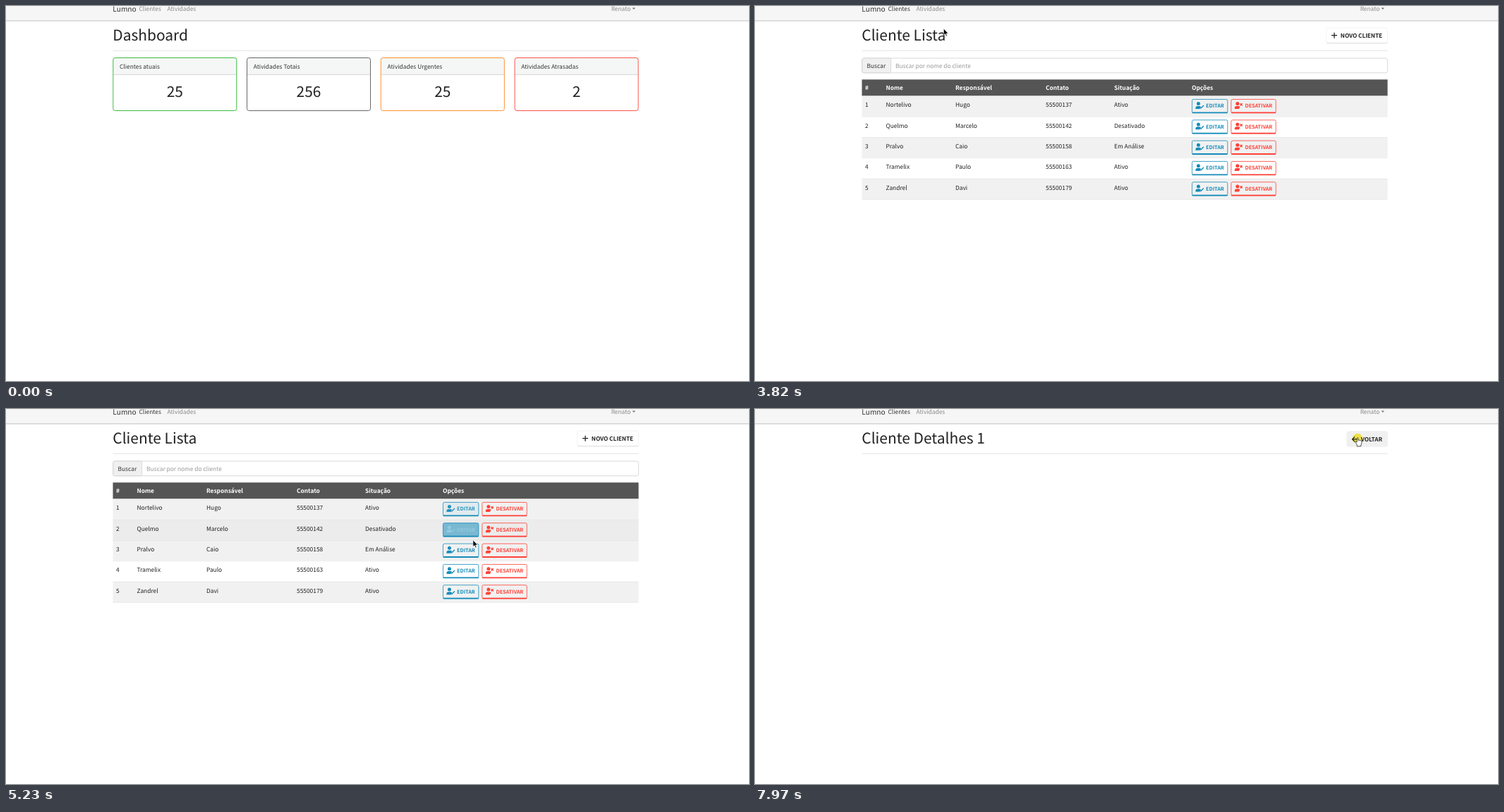
Animation, 1053 px wide and 532 px high, one loop 8000 ms. Source, as an HTML page:

```html
<!DOCTYPE html>
<html lang="pt">
<head>
<meta charset="utf-8">
<title>Dashboard</title>
<style>
html, body { margin: 0; width: 100%; height: 100%; overflow: hidden; background: #fff; }
svg { display: block; width: 100vw; height: 100vh; }
text {
  font-family: "Noto Sans CJK JP", "Noto Sans CJK SC", "Noto Sans CJK KR", "Noto Sans", sans-serif;
  text-rendering: geometricPrecision; white-space: pre;
}
.click { mix-blend-mode: multiply; }
</style>
</head>
<body>
<svg id="stage" viewBox="0 0 1053 532"></svg>
<script>
const LOOP = 8000, LIST_AT = 3620, DETAIL_AT = 6765;
const BODY = 8.4, TITLE = 20.95, INK = '#222';
const ROW_TOP = 127.5, ROW_H = 29.35;

const columns = [[156, '#'], [185.5, 'Nome'], [284, 'Responsável'], [412, 'Contato'], [509, 'Situação'], [619, 'Opções']];
const clients = [
  ['1', 'Nortelivo', 'Hugo', '55500137', 'Ativo'],
  ['2', 'Quelmo', 'Marcelo', '55500142', 'Desativado'],
  ['3', 'Pralvo', 'Caio', '55500158', 'Em Análise'],
  ['4', 'Tramelix', 'Paulo', '55500163', 'Ativo'],
  ['5', 'Zandrel', 'Davi', '55500179', 'Ativo']
];
const cards = [
  ['Clientes atuais', 25, '#28b62c'], ['Atividades Totais', 256, '#555'],
  ['Atividades Urgentes', 25, '#ff851b'], ['Atividades Atrasadas', 2, '#ff4136']
];

// Pointer path: time, x, y
const path = [
  [260, 1041, 522], [640, 774, 280], [800, 890, 290], [1010, 1007, 340], [1200, 800, 365],
  [1450, 450, 200], [1600, 361, 85], [1700, 420, 120], [1950, 546, 181], [2420, 300, 64],
  [2550, 203, 24], [2690, 131.5, 7.5], [2950, 140, 6], [3350, 204, 3], [3700, 204, 4],
  [4170, 450, 113], [4430, 497.5, 111.5], [4700, 560, 233], [4900, 630, 195], [5060, 645, 141],
  [5100, 649, 152], [5230, 662, 186], [5400, 640, 190], [5700, 560, 160], [6060, 506, 177],
  [6250, 540, 207], [6480, 642, 145], [6770, 642, 145], [6980, 300, 80], [7100, 143, 45],
  [7260, 320, 50], [7450, 700, 72], [7600, 812, 68], [7720, 838, 50], [7820, 854, 40.5], [8000, 854, 40.5]
];
const clicks = [[3430, 3560], [6560, 6700], [7890, 8000]];

const text = (x, y, s, size = BODY, fill = INK, extra = '') =>
  `<text x="${x}" y="${y}" font-size="${size}" fill="${fill}" ${extra}>${s}</text>`;
const rect = (x, y, w, h, fill, extra = '') =>
  `<rect x="${x}" y="${y}" width="${w}" height="${h}" fill="${fill}" ${extra}/>`;
const BOLD = 'font-weight="700"';
const heading = s => text(151.3, 48.7, s, TITLE) + rect(151.5, 63, 745, 1, '#e6e6e6');

function card([label, value, color], i) {
  const x = 151.8 + i * 189.75;
  return rect(x, 73.5, 175, 24, '#f5f7f7', 'rx="2.5"') + rect(x, 96.8, 175, .8, '#ccc') +
    rect(x, 73.5, 175, 75, 'none', `rx="3" stroke="${color}" stroke-width=".9"`) +
    text(x + 9.2, 88.8, label, BODY, '#333') +
    text(x + 87.5, 129.2, value, TITLE, INK, 'text-anchor="middle"');
}

function person(x, y, mark) {
  return `<g transform="translate(${x} ${y})"><circle cx="4" cy="2.6" r="2.5" fill="currentColor"/>
    <path d="M0 10V8.6Q0 6 2.6 6H5.4Q7 6 7.6 7L6 10Z" fill="currentColor"/>
    <path d="${mark}" fill="none" stroke="currentColor" stroke-width="1.4"/></g>`;
}

const buttons = [];
function outlineButton(x, w, row, label, color, mark) {
  const y = ROW_TOP + row * ROW_H + 4.9;
  buttons.push({ x, y, w, h: 19.5, color });
  return `<g class="btn" color="${color}">
    ${rect(x, y, w, 19, color, `class="fill" fill-opacity="0" rx="2" stroke="${color}" stroke-width=".8"`)}
    ${rect(x, y + 18, w, 1.8, color, 'rx=".9"')}
    <g class="face">${person(x + 5, y + 3.6, mark)}${text(x + 19.7, y + 11.9, label, 7.2, 'currentColor', BOLD)}</g></g>`;
}

function clientRow(cells, i) {
  const y = ROW_TOP + i * ROW_H;
  return rect(151.5, y, 745, ROW_H, '#fff', 'class="row"') + rect(151.5, y, 745, .6, '#e2e2e2') +
    cells.map((s, c) => text(columns[c][0], y + 15.7, s)).join('') +
    outlineButton(619.4, 50.4, i, 'EDITAR', '#158cba', 'M7 9.5L11.5 5') +
    outlineButton(674.8, 63.4, i, 'DESATIVAR', '#ff4136', 'M7.8 2.2L10.8 5.2M10.8 2.2L7.8 5.2');
}

function plainButton(x, label, icon) {
  return rect(x, 31.5, 896.4 - x, 22, '#e4e4e4', 'class="shade" rx="2.5"') +
    rect(x, 31, 896.4 - x, 21, '#fff', 'class="plain" rx="2.5" stroke="#f1f1f1" stroke-width=".8"') +
    `<g class="label"><path d="${icon}" fill="none" stroke="${INK}" stroke-width="1.3"/>
    ${text(889, 45, label, 8.15, INK, BOLD + ' text-anchor="end"')}</g>`;
}

const dashboard = heading('Dashboard') + cards.map(card).join('');
const list = heading('Cliente Lista') + plainButton(809.7, 'NOVO CLIENTE', 'M817 41.7H825M821 37.7V45.7') +
  rect(151.8, 74, 744.6, 20.8, '#fff', 'rx="2.7" stroke="#d0d0d0" stroke-width=".8"') +
  rect(151.8, 74, 40.8, 20.8, '#f0f0f0', 'rx="2" stroke="#d0d0d0" stroke-width=".8"') +
  text(158.5, 87.8, 'Buscar', BODY, '#333') + text(199, 87.8, 'Buscar por nome do cliente', BODY, '#999') +
  rect(151.5, 104.3, 745, 23.5, '#555') +
  columns.map(([x, s]) => text(x, 119.4, s, BODY, '#fff', BOLD)).join('') +
  clients.map(clientRow).join('') + rect(151.5, ROW_TOP + 5 * ROW_H, 745, .6, '#e2e2e2');
const detail = heading('Cliente Detalhes 1') +
  plainButton(838.7, 'VOLTAR', 'M854 41.7H846.6M850 38.2L846.5 41.7L850 45.2');

const stage = document.getElementById('stage');
stage.innerHTML = rect(0, 0, 1053, 532, '#fff') + rect(0, 0, 1053, 20, '#f6f6f6') + rect(0, 20, 1053, 1.8, '#dadada') +
  text(151.3, 7.5, 'Lumno', 10.2, '#333') + text(188.5, 7.2, 'Clientes', BODY, '#888', 'id="nav"') +
  text(228.5, 7.2, 'Atividades', BODY, '#888') + text(885.3, 7.2, 'Renato', BODY, '#888', 'text-anchor="end"') +
  '<path d="M887.5 2.6h4.6l-2.3 2.4z" fill="#777"/>' +
  [dashboard, list, detail].map(s => `<g class="page">${s}</g>`).join('') +
  `<circle class="click" r="7.2" fill="#fff04a"/>
  <g id="pointer">
    <path d="M0 0V9.3L2.1 7.4L3.6 10.8L5 10.2L3.6 6.9H6.5Z" fill="#000" stroke="#fff" stroke-width=".6"/>
    <path d="M-.9 1V6.6L-2.1 5.4Q-3.4 5-3.2 6.4L-.8 10.4V12.4H4.8V10.4L5.8 8V5Q5.5 4 4.4 4.3Q3.7 3.6 2.8 4Q2 3.3 .9 3.8V1A.9.9 0 0 0-.9 1Z" fill="#fff" stroke="#222" stroke-width=".8"/>
  </g>`;

const all = s => [...stage.querySelectorAll(s)];
const pages = all('.page'), rows = all('.row'), btns = all('.btn'), nav = stage.querySelector('#nav');
const pointer = stage.querySelector('#pointer'), [arrow, hand] = pointer.children;
const click = stage.querySelector('.click');
const back = ['.plain', '.shade', '.label'].map(s => pages[2].querySelector(s));
const show = (el, on) => { el.style.display = on ? '' : 'none'; };

function pointerAt(t) {
  const i = Math.max(1, path.findIndex(p => p[0] >= t));
  const [a, b] = [path[i - 1], path[i]];
  const k = Math.max(0, (t - a[0]) / (b[0] - a[0]));
  return [a[1] + (b[1] - a[1]) * k, a[2] + (b[2] - a[2]) * k];
}
const pageAt = t => t < LIST_AT ? 0 : t < DETAIL_AT ? 1 : 2;
const inside = ([px, py], { x, y, w, h }) => px >= x && px <= x + w && py >= y && py <= y + h;

// Share of the last 150 ms spent over a button, giving a linear fade
function hoverAmount(t, box) {
  let n = 0;
  for (let d = 0; d < 150; d += 10) n += pageAt(t - d) === 1 && inside(pointerAt(t - d), box);
  return n / 15;
}

function draw(t) {
  const pos = pointerAt(t), [x, y] = pos, page = pageAt(t);
  pages.forEach((p, i) => show(p, i === page));
  nav.setAttribute('fill', page ? '#333' : '#888');
  let link = inside(pos, { x: 188, y: 0, w: 81, h: 14 });

  if (page === 1) {
    const over = Math.floor((y - ROW_TOP) / ROW_H);
    rows.forEach((r, i) => r.setAttribute('fill', i === over ? '#ececec' : i % 2 ? '#fff' : '#f1f1f1'));
    buttons.forEach((b, i) => {
      const a = hoverAmount(t, b);
      btns[i].querySelector('.fill').setAttribute('fill-opacity', a);
      btns[i].querySelector('.face').style.color = `color-mix(in srgb, #fff ${a * 100}%, ${b.color})`;
      link = link || inside(pos, b);
    });
  }
  if (page === 2) {
    const over = inside(pos, { x: 838, y: 31, w: 59, h: 23 });
    const [plain, shade, label] = back;
    plain.setAttribute('fill', over ? '#f0f0f0' : '#fff');
    plain.setAttribute('y', over ? 32 : 31);
    shade.setAttribute('fill', over ? '#eaeaea' : '#e4e4e4');
    label.setAttribute('transform', `translate(0 ${over ? 1.2 : 0})`);
    link = link || over;
  }

  show(pointer, t >= 260);
  show(arrow, !link);
  show(hand, link);
  pointer.setAttribute('transform', `translate(${x} ${y})`);
  show(click, clicks.some(([a, b]) => t >= a && t < b));
  click.setAttribute('transform', `translate(${x} ${y + 1.5})`);
}

const start = performance.now();
function tick() {
  draw((performance.now() - start) % LOOP);
  requestAnimationFrame(tick);
}
tick();
</script>
</body>
</html>
```
